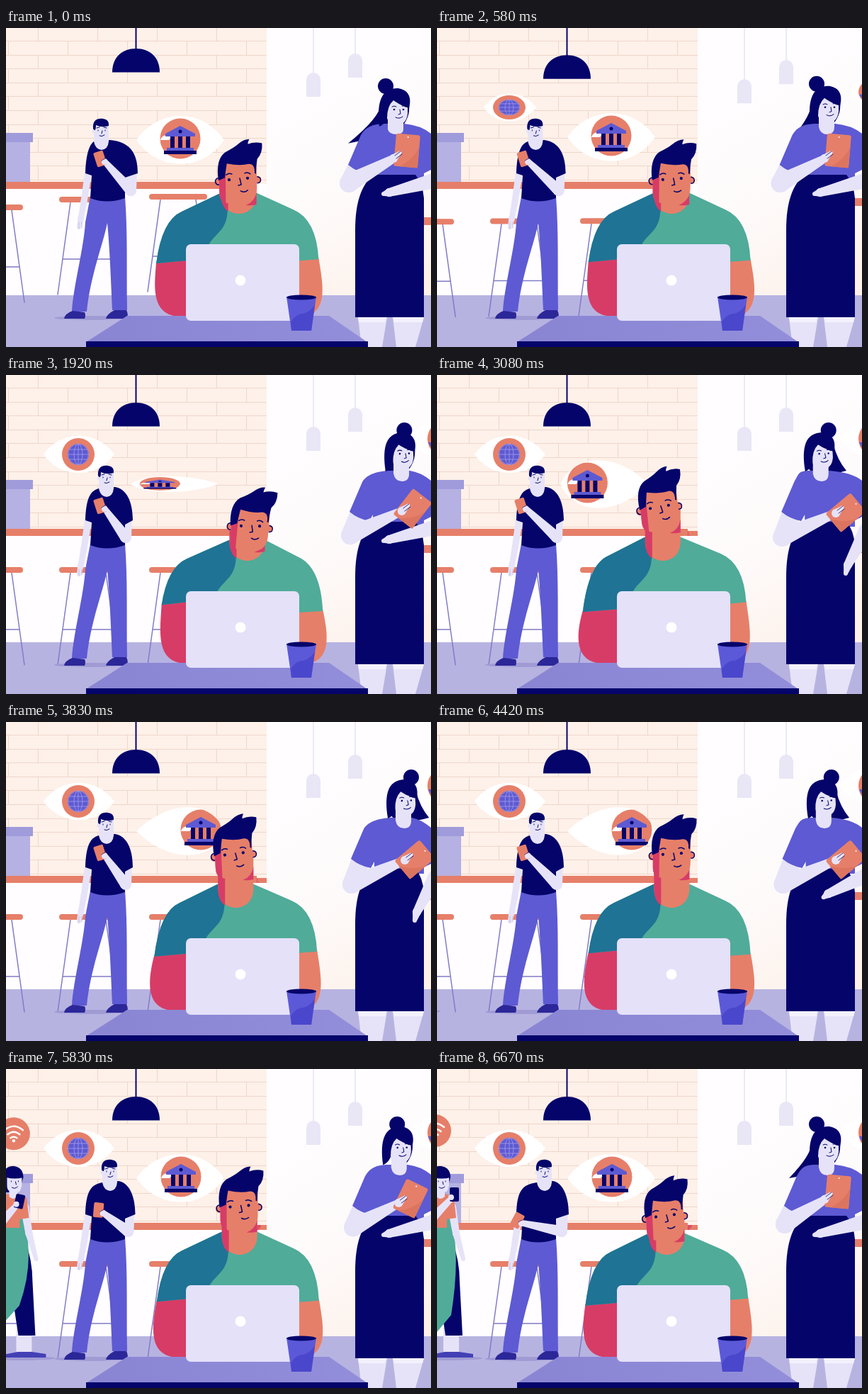
An HTML page with a canvas that plays this animation: 600 by 450 pixels, repeating every 6.76 s.

```html
<!DOCTYPE html>
<html lang="en">
<head>
<meta charset="utf-8">
<title>Café</title>
<style>
  html, body { margin: 0; width: 100%; height: 100%; overflow: hidden; }
  canvas { display: block; width: 600px; height: 450px; }
</style>
</head>
<body>
<canvas width="600" height="450"></canvas>
<script>
const c = document.querySelector('canvas').getContext('2d');
const LOOP = 6760, STEP = 250 / 3, SWAY = 1910;
const NAVY = '#04046a', BLUE = '#5d5ad3', CORAL = '#e67f69', PINK = '#d73c66', SHOE = '#2b2798',
      SKIN = '#e6e3f8', LILAC = '#b7b3e1', GREEN = '#50ab99', TEAL = '#1f7394', SHADE = '#a09bd3';
let t = 0;

// Timing
const smooth = u => { u = Math.min(1, Math.max(0, u)); return u * u * (3 - 2 * u); };
const ramp = (from, to) => smooth((t - from) / (to - from));
const bump = (mid, half) => smooth(1 - Math.abs(t - mid) / half);
const sway = () => Math.cos(2 * Math.PI * t / SWAY);
const mix = (a, b, u) => a + (b - a) * u;

// Drawing
function fill(color, d) { c.fillStyle = color; c.fill(new Path2D(d)); }
function line(color, w, d) {
  c.strokeStyle = color; c.lineWidth = w; c.lineCap = c.lineJoin = 'round';
  c.stroke(new Path2D(d));
}
function disc(color, x, y, r, ry = r) {
  c.fillStyle = color; c.beginPath(); c.ellipse(x, y, r, ry, 0, 0, 7); c.fill();
}
function box(color, x, y, w, h, r = 0) {
  c.fillStyle = color; c.beginPath(); c.roundRect(x, y, w, h, r); c.fill();
}
function group(x, y, deg, draw) {
  c.save(); c.translate(x, y); c.rotate(deg * Math.PI / 180); draw(); c.restore();
}
function limb(x1, y1, r1, x2, y2, r2) {
  const a = Math.atan2(y2 - y1, x2 - x1), s = Math.sin(a), k = Math.cos(a);
  disc(SKIN, x1, y1, r1); disc(SKIN, x2, y2, r2);
  fill(SKIN, `M${x1 - s * r1} ${y1 + k * r1}L${x2 - s * r2} ${y2 + k * r2}
    L${x2 + s * r2} ${y2 - k * r2}L${x1 + s * r1} ${y1 - k * r1}Z`);
}
function gradient(x1, y1, x2, y2, ...colors) {
  const g = c.createLinearGradient(x1, y1, x2, y2);
  colors.forEach((col, i) => g.addColorStop(i / (colors.length - 1), col));
  return g;
}

function room(settle) {
  box('#fdf1e9', 0, 0, 368, 220);
  let bricks = '';
  for (let row = 0; row < 11; row++) {
    const y = Math.round(18 + row * 19.6) + .5;
    bricks += `M0 ${y}H368`;
    for (let x = row % 2 ? 3.5 : 45.5; x < 368; x += 84) bricks += `M${x} ${y - 19.6}V${y}`;
  }
  line('#efd6cb', 1, bricks);
  box(gradient(400, 100, 560, 380, '#fffdff', '#fefafa', '#fdf1e9'), 368, 0, 232, 377);
  box('#fffdff', 0, 227, 368, 150);
  box(LILAC, 0, 377, 600, 73);
  box('#b5b1e2', 0, 160, 34, 57);
  box('#a09bdb', 0, 148, 38, 13);
  box(CORAL, 0, 217, 354, 10);

  group(0, -10 * settle, 0, () => {
    line(NAVY, 2, 'M183.500 0V42');
    fill(NAVY, 'M150 72.500C150 51 164 39 183.500 39S217 51 217 72.500Z');
    for (const [x, y] of [[434, 74], [493, 47]]) {
      line('#e6e3f3', 1.5, `M${x} 0V${y}`);
      box('#e9e6f6', x - 10, y - 1, 20, 34, [10, 10, 0, 0]);
    }
  });
}

function stool(x, rise) {
  group(x, -rise, 0, () => {
    line('#817bc6', 1.5, 'M-25 279L-43 409M25 279L43 409M-36 359H36');
    box(CORAL, -41, 271, 82, 8, 4);
  });
}

// Floating eyes
function eye(x, y, w, h, gaze, open, icon) {
  c.save();
  c.translate(x, y); c.scale(1, Math.max(open, .01));
  const a = gaze / 2 - w / 2, b = gaze / 2 + w / 2;
  const lens = new Path2D(`M${-w} 0C${a} ${-h} ${b} ${-h} ${w} 0C${b} ${h} ${a} ${h} ${-w} 0`);
  c.fillStyle = '#fff'; c.fill(lens); c.clip(lens);
  c.translate(gaze, 0); icon();
  c.restore();
}
function bank() {
  disc(CORAL, 0, -2, 28.5);
  fill('#fff', 'M-28 0Q-26 -7 -18 -7Q-14 -11 -11 -6L-16 0Z');
  fill(BLUE, 'M-21 -9L0 -20L21 -9V-5H-21Z');
  disc(NAVY, 0, -12, 2.5);
  for (let x = -14; x < 10; x += 11) box(NAVY, x, -5, 6, 17);
  box(BLUE, -19, 11, 38, 4);
  box(NAVY, -23, 15, 46, 5);
}
function globe() {
  disc(CORAL, 0, 0, 23);
  disc(BLUE, 0, 0, 15);
  c.strokeStyle = '#9f97e4'; c.lineWidth = .9;
  for (const r of [6, 14.5]) { c.beginPath(); c.ellipse(0, 0, r, 14.5, 0, 0, 7); c.stroke(); }
  line('#9f97e4', .9, 'M-15 0H15M0 -15V15M-13 -7H13M-13 7H13');
}
function halfDisc() {
  disc(CORAL, 0, 0, 26);
  fill(BLUE, 'M-25 5H25Q16 25 0 26Q-16 25 -25 5Z');
}
function eyes() {
  const gaze = -24 * ramp(1500, 2050) + 53 * ramp(3100, 3800) - 28 * ramp(4500, 5100);
  const blink = bump(1920, 260) + bump(5000, 260), pop = ramp(250, 750);
  eye(246 + .4 * Math.min(gaze, 0), 154 + 4 * (1 - ramp(0, 600)), 62, 45, gaze, 1 - .67 * blink, bank);
  eye(103, 112, 50 * pop, 35, -1, pop, globe);
  eye(621, 90, 52 * pop, 36, 0, pop, halfDisc);
}

function standingMan() {
  const drop = ramp(5000, 6670), lean = 7 * (1 - ramp(0, 1000));
  const hx = 142 - lean + 10 * drop, wide = lean + 7 * drop;
  const px = 125 + 8 * sway() - 4 * drop, py = 185 + 29 * drop;
  const elbowX = 169 + wide, elbowY = 229;

  disc(SHADE, 120, 409, 52, 3);
  fill(BLUE, `M119 238H168C172 290 170 340 171 398H150C148 350 146 305 143 275
    C137 305 119 350 114 400H93C95 365 110 310 112 274Z`);
  fill(SHOE, 'M82 410Q83 403 94 399L111 401Q113 405 111 410Z');
  fill(SHOE, 'M141 410Q142 404 153 398L170 398Q173 404 171 410Z');
  limb(116, 205, 5, 110, 245, 4.5);
  limb(110, 245, 4.5, 106, 267, 4);
  limb(106, 267, 4.5, 103, 281, 3);
  line('#b9b5e0', .8, 'M103 274V283M107 274V282');
  limb(170 + wide, 200, 8, elbowX, elbowY, 8);
  fill(NAVY, `M${hx - 11} 160C120 163 113 172 112 205L121 208L119 240Q142 249 168 240
    V211L${179 + wide} 205C${179 + wide} 180 ${171 + wide} 161 ${hx + 12} 158Z`);

  group(hx, 145, 0, () => {
    fill(SKIN, 'M-11 -10V15Q-9 26 0 27Q9 26 10 15V-10Z');
    fill(NAVY, 'M-12 -3C-13 -14 -7 -18 2 -17Q11 -16 10 -7Q0 -4 -8 -8Q-8 -2 -10 1Z');
    disc(SKIN, -11, 1, 2.5);
    line(NAVY, 1, 'M-5 -1V0M5 -1V0M1 0L0 4M-3 7Q0 9 4 6M-7 -4L-3 -5M3 -5L7 -4');
  });
  limb(elbowX, elbowY, 8, px + 6, py + 3, 4);
  group(px, py, -18 + 46 * drop, () => box(CORAL, -7, -11, 14, 21, 2));
  disc(SKIN, px + 6, py + 4, 4);
  line(NAVY, .7, `M${px + 2} ${py + 2}l5 -3`);
}

function walkingGirl() {
  if (t < 4150) return;
  const leave = ramp(5200, 6670), dx = -95 * (1 - ramp(4150, 4900)) - 9 * leave;
  group(20 + dx - 14 * leave, 94 - 7 * leave, 0, () => {
    disc(CORAL, 0, 0, 23);
    line('#fff', 2.4, 'M-13 -5Q0 -16 13 -5M-8.500 1Q0 -6 8.500 1M-4.500 6Q0 3 4.500 6');
    disc('#fff', 0, 10, 2.2);
  });
  group(dx, 0, 0, () => {
    disc(SHADE, 25, 408, 48, 3);
    box(SKIN, 18, 365, 22, 36);
    fill(NAVY, 'M15 240H30Q41 270 41 300L45 376H21L8 290Z');
    fill('#4340b6', 'M0 407V403L20 399H40L60 402V407Z');
    fill(GREEN, `M-5 205H32L35 250Q38 290 ${18 + 11 * leave} ${325 + 22 * leave}L-5 ${348 + 40 * leave}Z`);
    limb(30, 195, 6, 36, 232, 5);
    limb(36, 232, 5, 46, 268, 3);
    fill(CORAL, 'M-4 178Q28 172 33 183L36 210L23 212V224H-5Z');
    fill(NAVY, 'M-2 174C-3 145 2 136 15 137Q28 139 28 153Q25 165 21 174Z');
    fill(SKIN, 'M5 151H26V164Q24 174 20 174V180Q14 186 8 180V172Q5 170 5 164Z');
    fill(NAVY, 'M1 155C3 139 22 137 28 153Q16 156 4 153Z');
    line(NAVY, 1, 'M11 158V159M21 158V159M17 159L18 163M12 167Q16 170 20 166');
    const px = 15 + 18 * leave, py = 193 - 16 * leave;
    limb(-5, 218, 7, px - 3, py + 5, 4);
    group(px, py, 20 - 20 * leave, () => box(NAVY, -6, -10, 13, 20, 2));
    disc(SKIN, px - 4, py + 4, 4);
  });
}

function woman() {
  const low = ramp(1170, 2300) - ramp(5200, 6400);
  const hang = ramp(2300, 2900) - ramp(3900, 4700);
  const hx = 551 + 11 * low * sway(), hy = 113 + 4 * (1 - ramp(0, 800)), nx = hx - 3;
  const swing = -26 - 42 * (1 - ramp(0, 1170)) + 62 * ramp(1800, 2900) - 90 * ramp(5200, 6670);
  const tx = hx + swing, ty = hy + 22 + Math.max(0, -swing) * .35;
  const sx = 483 + 7 * t / LOOP, ex = sx + 1, ey = mix(219, 229, low);
  const tabX = mix(566, 577, low), tabY = mix(173, 194, low);
  const handX = mix(553, 569, low), handY = mix(181, 192, low);
  const restX = mix(541, 580, hang), restY = mix(232, 268, hang);

  box(CORAL, 578, 240 + 27 * (1 - ramp(0, 600)), 40, 11, 4);
  fill(SKIN, 'M497 408H538L531 450H502Z M546 408H590L578 450H551Z');
  fill('#f3f1fc', 'M497 408H537L535 415H498Z M546 408H590L588 415H548Z');
  disc(NAVY, hx + mix(-15, 10, low), hy - 35, 11);
  const right = Math.max(0, swing) / 37;
  fill(NAVY, `M${hx - 22} ${hy - 10}Q${hx - 22} ${hy + 8} ${mix(tx, hx - 19, right)} ${mix(ty, hy + 20, right)}
    Q${hx - 8} ${hy + 34} ${mix(hx + 8, tx, right)} ${hy + 22}Q${hx + 22} ${hy + 6} ${hx + 17} ${hy - 15}Z`);
  limb(sx + 16, 190, 13, ex, ey, 13);
  fill(BLUE, `M${nx - 16} 135C${nx - 30} 136 ${sx + 25} 139 ${sx + 18} 151L${sx} 193Q${sx + 12} 203 ${sx + 28} 206
    L${sx + 33} 197V214H590V205L600 200V149Q585 137 ${nx + 14} 135Z`);
  fill(NAVY, 'M518 207C502 222 493 245 493 285V408H590V240Q588 218 578 207Z');
  fill(SKIN, `M${hx - 12} ${hy}V${hy + 26}Q${hx - 10} 150 ${hx} 150Q${hx + 10} 150 ${hx + 10} ${hy + 26}V${hy}Z`);

  group(hx, hy, -3 * low, () => {
    fill(SKIN, 'M-14 -20V4Q-13 20 0 20Q14 20 16 4V-20Z');
    fill(NAVY, 'M-24 22C-28 -15 -20 -32 2 -32C18 -30 22 -18 18 -4C8 -7 0 -12 -4 -15Q-13 -7 -13 10Q-15 18 -24 22Z');
    disc(NAVY, -3, -2, 1.3); disc(NAVY, 10, -2, 1.3);
    line(NAVY, 1, 'M-6 -6Q-3 -8 0 -6M8 -7Q11 -8 13 -6M5 -2L6 4L3 5M-1 9Q4 12 9 8');
  });

  limb(606, mix(215, 220, hang), 11, restX, restY, 6);
  limb(restX, restY, 6, restX - mix(8, 3, hang), restY + mix(2, 12, hang), 3);
  limb(ex, ey, 13, handX, handY, 5);
  group(tabX, tabY, mix(5, 50, low), () => {
    box(CORAL, -17, -23, 34, 46, 3);
    fill('#dc755f', 'M17 -8V23H-8Q12 10 17 -8Z');
    disc('#fff', 0, -19, 1);
  });
  limb(handX - 6, handY + 3, 6, handX + 3, handY - 5, 2.5);
  line(NAVY, .8, `M${handX - 4} ${handY - 1}l8 -6M${handX - 2} ${handY + 3}l8 -6`);
}

function laptopMan() {
  // Leaning and sitting up drive the whole body
  const lean = -2 + 17 * ramp(0, 1920) - 31 * ramp(1920, 3080) + 23 * ramp(3080, 5000) - 15 * ramp(5000, 6670);
  const risen = ramp(1920, 3080) - ramp(5000, 7400);
  const hx = 330 + lean, hy = 213 - 27 * risen, nx = 330 + .7 * lean, n = 233 - 4 * risen;
  const l = 213 + .45 * lean, ly = 331 - .45 * lean - 4 * risen, armL = l - 6 * risen;
  const r = 442 + .35 * lean, ry = 327 + .4 * lean, armR = r + 5;

  fill(PINK, `M${l} ${ly - 2}C${armL - 2} 360 ${armL - 10} 407 ${armL + 36} 407H300V${ly - 8}Z`);
  fill(CORAL, `M${r} ${ry - 2}C${armR + 1} 360 ${armR + 8} 396 ${armR - 20} 406H400V${ry - 2}Z`);
  const left = `M${nx - 26} ${n}L${l + 36} ${n + 26}Q${l + 8} ${n + 38} ${l} ${ly}L256 ${ly - 4}`;
  fill(GREEN, `${left}H300L414 ${ry + 2}L${r} ${ry}Q${r - 3} ${n + 37} ${r - 36} ${n + 23}L${nx + 26} ${n}Z`);
  fill(TEAL, `${left}H${nx - 42}V305C${nx - 32} 288 ${nx - 14} 285 ${nx - 16} 250V${n}Z`);

  fill(CORAL, `M${nx - 25} ${hy}V235C${nx - 25} 271 ${nx + 25} 271 ${nx + 25} 235V${hy}Z`);
  fill(PINK, `M${nx - 25} ${hy}V235Q${nx - 25} 252 ${nx - 15} 259V${hy}Z`);
  fill(PINK, `M${nx + 10} ${hy + 37}Q${nx + 22} ${hy + 33} ${nx + 25} ${hy + 18}V${hy + 36}Q${nx + 18} ${hy + 38} ${nx + 10} ${hy + 37}`);

  group(hx, hy, .35 * lean, () => {
    disc(CORAL, -28, 4, 5.5); disc(CORAL, 27, 1, 5);
    line(NAVY, 1.5, 'M-27 -2Q-34 -1 -32 5Q-31 8 -27 8M27 -3Q33 -2 31 4Q30 6 27 6');
    fill(CORAL, 'M-27 -25V20Q-27 36 0 36Q25 36 26 14V-25Z');
    fill(PINK, 'M-27 -22H-18V35Q-27 32 -27 18Z');
    fill(NAVY, `M-28 2C-31 -18 -27 -32 -18 -38Q-6 -44 0 -49Q8 -56 16 -56Q14 -52 14 -49Q24 -53 34 -50
      Q35 -36 27 -28Q25 -18 25 -7L23 -8Q24 -21 15 -21Q2 -18 -16 -22Q-18 -10 -19 -2Z`);
    disc(NAVY, -13, 1, 2.1); disc(NAVY, 13, -1, 2.1);
    line(NAVY, 1.5, 'M-17 -6Q-13 -9 -9 -7M9 -8Q13 -10 17 -7M2 -1L4 8L0 9M3 17Q8 20 13 16');
  });
}

function desk() {
  fill(gradient(113, 0, 510, 0, '#8a85d3', '#938eda'), 'M171 406H456L510 443H113Z');
  box(NAVY, 113, 442, 398, 8);
  box('#e4e1f9', 254, 305, 160, 108, 7);
  disc('#fff', 331, 356, 7.5);
  fill('#5c59d8', 'M396 379H438L431 427H403Z');
  fill('#4a47cc', 'M436 390L431 427H403L402 415Q410 402 420 403Q430 400 436 390Z');
  disc(NAVY, 417, 380, 21, 3.5);
}

function frame(elapsed) {
  t = Math.floor((elapsed % LOOP + 4) / STEP) * STEP;
  const settle = 1 - ramp(0, 700);
  room(settle);
  stool(-17, 22 * settle);
  stool(116, 33 * settle);
  stool(243, 37 * settle);
  eyes();
  walkingGirl();
  standingMan();
  woman();
  laptopMan();
  desk();
  requestAnimationFrame(now => frame(Math.max(0, now - start)));
}
const start = performance.now();
frame(0);
</script>
</body>
</html>
```
